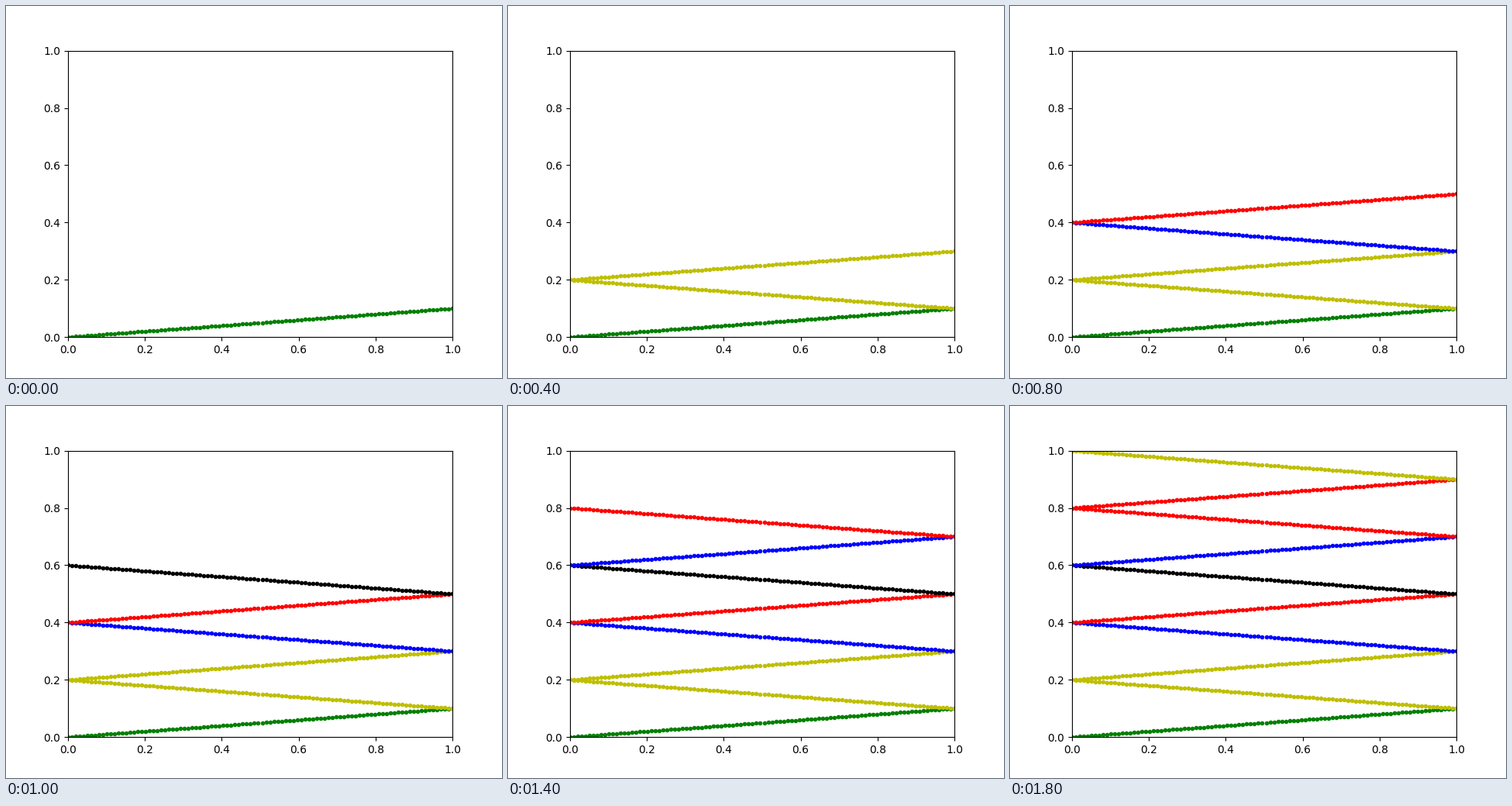
These frames come from a looping animation (640x480 px, 2000 ms). A matplotlib script:

```python
import numpy as np
import matplotlib.pyplot as plt
from matplotlib.animation import FuncAnimation

COLORS = "gyybrkbrry"
STEP = 0.1

fig, ax = plt.subplots(figsize=(6.4, 4.8), dpi=100)
ax.set_xlim(0, 1)
ax.set_ylim(0, 1)

# Zigzag: even segments run left to right, odd ones come back.
t = np.linspace(0, 1, 100)
segments = []
for i, color in enumerate(COLORS):
    x = t if i % 2 == 0 else 1 - t
    line, = ax.plot(x, STEP * (i + t), color + ".", visible=False)
    segments.append(line)


def update(frame):
    for i, line in enumerate(segments):
        line.set_visible(i <= frame)
    return segments


anim = FuncAnimation(fig, update, frames=len(COLORS), interval=200,
                     repeat=True, repeat_delay=0, blit=False)
plt.show()
```
